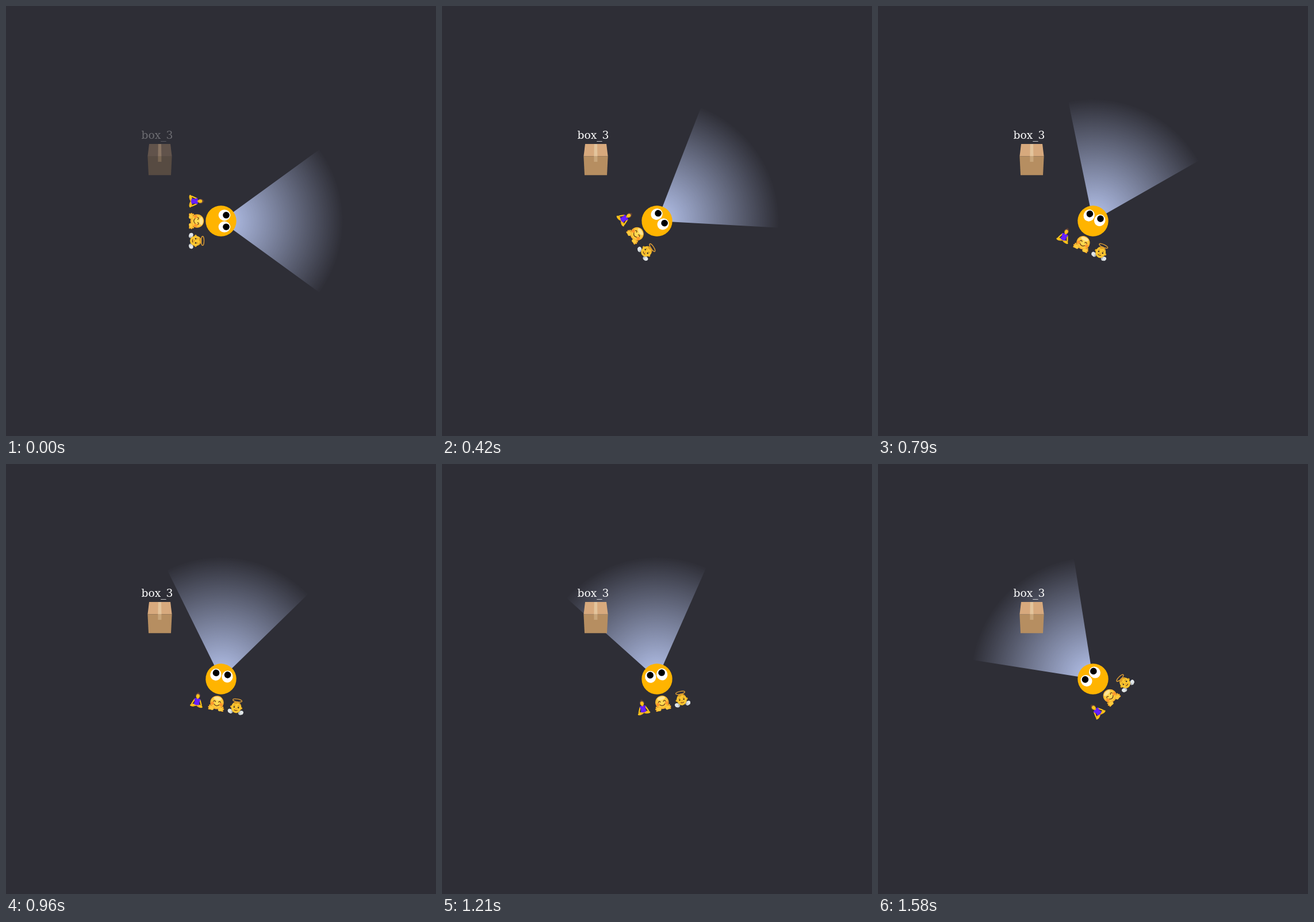
Write an HTML page with a canvas that moves like this. It is 748x748 px and loops after 2000 ms.

```html
<!DOCTYPE html>
<html lang="en">
<head>
<meta charset="utf-8">
<title>Looking for the box</title>
<style>
  html, body { margin: 0; height: 100%; overflow: hidden; background: #2e2e36; }
  canvas { display: block; width: 748px; height: 748px; }
</style>
</head>
<body>
<canvas id="stage" width="748" height="748"></canvas>
<script>
const ctx = document.getElementById('stage').getContext('2d');
const LOOP = 2000, FPS = 24, CENTER = 374;
const START = 1, END = 38, TURN = 135;
const RAD = Math.PI / 180;

function ellipse(x, y, rx, ry, fill, tilt = 0) {
  ctx.beginPath();
  ctx.ellipse(x, y, rx, ry, tilt, 0, 7);
  ctx.fillStyle = fill;
  ctx.fill();
}

const circle = (x, y, r, fill) => ellipse(x, y, r, r, fill);

function shape(path, fill) {
  ctx.fillStyle = fill;
  ctx.fill(new Path2D(path));
}

function line(path, color, width) {
  ctx.strokeStyle = color;
  ctx.lineWidth = width;
  ctx.lineCap = ctx.lineJoin = 'round';
  ctx.stroke(new Path2D(path));
}

function at(x, y, draw) {
  ctx.save();
  ctx.translate(x, y);
  draw();
  ctx.restore();
}

function mirrored(draw) {
  for (const side of [-1, 1]) {
    ctx.save();
    ctx.scale(side, 1);
    draw();
    ctx.restore();
  }
}

function cone() {
  const glow = ctx.createRadialGradient(0, 0, 0, 0, 0, 213);
  glow.addColorStop(0, 'rgba(184,198,240,1)');
  glow.addColorStop(1, 'rgba(184,198,240,0)');
  ctx.fillStyle = glow;
  ctx.beginPath();
  ctx.moveTo(0, 0);
  ctx.arc(0, 0, 213, -126 * RAD, -54 * RAD);
  ctx.fill();
}

function head() {
  circle(0, 0, 26.7, '#ffb400');
  mirrored(() => {
    ellipse(10.2, -6, 9.6, 10.4, '#fff');
    circle(10.2, -9, 5.8, '#000');
  });
}

function yogi() {
  circle(0, -11.5, 2.2, '#543930');
  ellipse(0, -7.6, 4.1, 4.2, '#6d4c41');
  ellipse(0, -6.6, 2.9, 3.7, '#fcc21b');
  shape('M-1.4 -4h2.8v4h-2.8z', '#f0ae18');
  mirrored(() => {
    line('M4.5 -1L7 4.5L8.5 8', '#fcc21b', 2.2);
    ellipse(5.5, 9.8, 5.6, 2.4, '#fcc21b', 0.2);
  });
  shape('M-5.5 -1.5Q-3 -3.5 -1.5 -3Q0 0 1.5 -3Q3 -3.5 5.5 -1.5L4 3L4.8 8Q0 10 -4.8 8L-4 3Z', '#651fff');
  line('M-5 11Q0 8.5 5 11', '#e59a10', 0.8);
}

function hugger() {
  const skin = ctx.createRadialGradient(0, -2, 2, 0, -2, 12);
  skin.addColorStop(0, '#ffdc55');
  skin.addColorStop(0.65, '#ffcb3c');
  skin.addColorStop(1, '#f7a928');
  circle(0, -1.5, 11.7, skin);
  ellipse(0, -8.8, 7, 3, 'rgba(255,240,190,.65)');
  mirrored(() => {
    circle(7.5, 1, 2.8, 'rgba(255,112,32,.55)');
    line('M2.6 -2.5Q4.5 -5.6 6.4 -2.5', '#6b3f18', 1.3);
    line('M8.2 10L11.4 5.2M8.6 10.5L12.7 8.2M8.2 11L12 11.3', '#df8a16', 3);
    ellipse(7.6, 9.5, 4, 3, '#ffca3d', -0.5);
    line('M8.2 10L11.4 5.2M8.6 10.5L12.7 8.2M8.2 11L12 11.3', '#ffca3d', 1.8);
  });
  line('M-4.4 2Q0 6.6 4.4 2', '#6b3f18', 1.3);
}

function cherub() {
  mirrored(() => {
    ellipse(9.3, 9.2, 4.7, 3.6, '#b6bdc1', -0.5);
    ellipse(10.6, 8.5, 3.1, 3, '#e1e6e8');
    line('M8 12.2L12 11', '#dce1e3', 1.8);
    circle(8.7, 1.2, 2, '#e9a91c');
  });
  ellipse(0, 1, 8.7, 10, '#fcc630');
  shape('M-6 -5Q-2 -12 4 -8Q7 -6 7 -3Q3 -5 2 -7Q-1 -3 -6 -5Z', '#dda026');
  mirrored(() => {
    circle(3.7, 1, 1.35, '#40342d');
    line('M2.5 -1.8Q3.8 -2.8 5 -1.8', '#a46f18', 0.7);
  });
  ellipse(0, 3.4, 1.2, 0.8, '#dc9223');
  line('M-2.5 6Q0 7.5 2.5 6', '#76431b', 1.2);
  ctx.beginPath();
  ctx.ellipse(0, -11, 8, 2.5, 0, 0, 7);
  ctx.strokeStyle = '#d99a35';
  ctx.lineWidth = 1.4;
  ctx.stroke();
}

function box(alpha) {
  ctx.globalAlpha = alpha;
  shape('M249 240H286L288.6 261.5H246.4Z', '#d7a97d');
  shape('M246.4 261.5H288.6L287 294.3H248Z', '#b68e61');
  shape('M264.8 240H270L270.4 261.5H264.4Z', '#e3c49c');
  shape('M264.4 261.5H270.4V271H264.4Z', '#c8a67b');
  ctx.fillStyle = '#fff';
  ctx.font = '18.7px "DejaVu Serif", serif';
  ctx.fillText('box_3', 235.5, 231);
  ctx.globalAlpha = 1;
}

function render(time) {
  // Steps run at 24 per second, on a clock with a 10 ms grain.
  const tick = Math.floor(time / 10) * 10;
  const step = Math.ceil((tick + 5) * FPS / 1000) - 1;
  const moving = step > 2;
  const heading = moving ? TURN * (Math.min(step, END) - START) / (END - START) : 0;

  ctx.clearRect(0, 0, 748, 748);
  const turned = draw => at(CENTER, CENTER, () => {
    ctx.rotate((90 - heading) * RAD);
    draw();
  });
  turned(cone);
  box(moving ? 1 : 0.3);
  turned(() => {
    head();
    at(-34.5, 43, yogi);
    at(0, 43, hugger);
    at(34.5, 43, cherub);
  });
}

const began = performance.now();
function loop() {
  render((performance.now() - began) % LOOP);
  requestAnimationFrame(loop);
}
loop();
</script>
</body>
</html>
```
